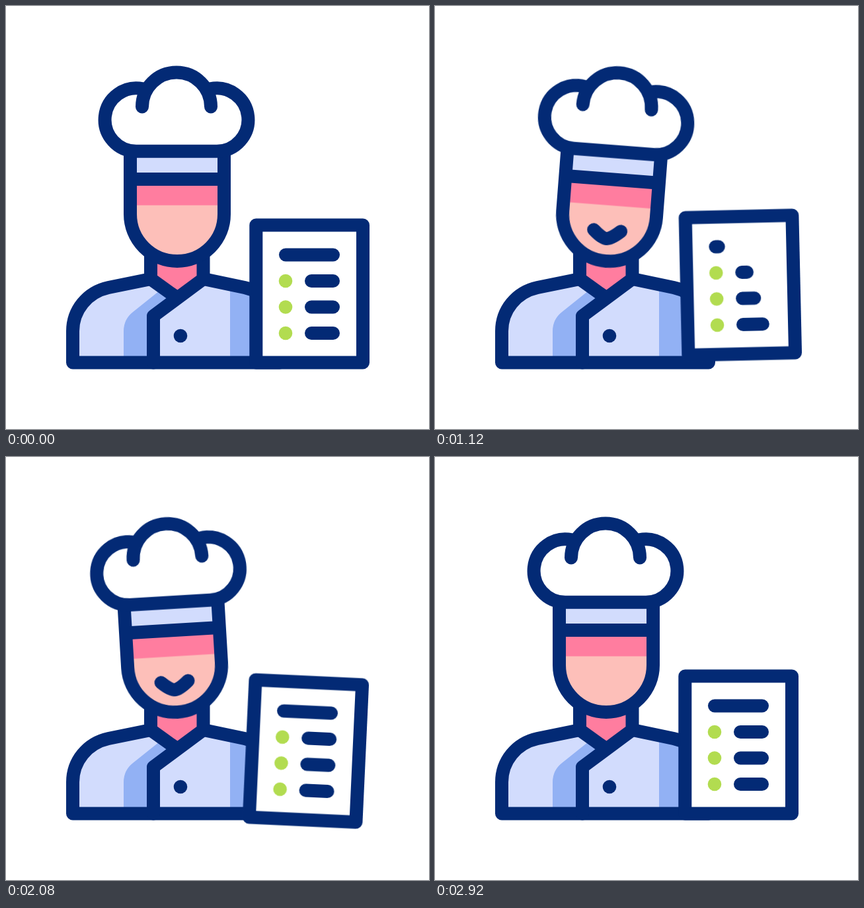
Recreate the animation shown at these times as an HTML page. Size 640x640 px, loop 3.08 s.

```html
<!DOCTYPE html>
<html lang="en">
<head>
<meta charset="utf-8">
<title>Chef with menu</title>
<style>
  html, body { margin: 0; width: 100%; height: 100%; overflow: hidden; background: #fff; }
  svg { display: block; width: 100vw; height: 100vh; }

  .ink { fill: none; stroke: #032a75; stroke-width: 20; stroke-linecap: round; stroke-linejoin: round; }
  .cloth { fill: #d2dcfd; }
  .shade { fill: #92b1f4; }
  .pink { fill: #ff7d9f; }
  .skin { fill: #fdbfb9; }
  .white { fill: #fff; }
  .green { fill: #b2dc50; }
  .gold { fill: #ffcb4f; }

  .head, .tilt, .lift, .trim, .smile, .gold {
    animation: 3080ms cubic-bezier(.37, 0, .63, 1) infinite both;
  }
  .head { transform-origin: 259px 381px; animation-name: nod; }
  .tilt { transform-origin: 459px 313px; animation-name: tilt; }
  .lift { animation-name: lift; }
  .smile { stroke-dasharray: 1.02 2; animation-name: smile; }
  .trim { stroke-dasharray: 1.02 2; animation-timing-function: linear; }
  .gold { transform-box: fill-box; transform-origin: center; animation-name: rise, pop; }

  @keyframes nod {
    0%, 7.79%, 45.45%, 47.08%, 81.17%, 100% { transform: rotate(0deg); }
    16.23%, 72.08% { transform: rotate(-5deg); }
    33.77%, 54.9% { transform: rotate(5deg); }
  }
  @keyframes tilt {
    0%, 9.74%, 80.84%, 100% { transform: rotate(0deg); }
    20.97%, 41.23%, 61.36% { transform: rotate(-5.5deg); }
    29.87%, 51.95%, 70.78% { transform: rotate(5.5deg); }
  }
  @keyframes lift {
    0%, 7.79%, 76.95%, 100% { transform: translateY(0); }
    16.88%, 38.31%, 58.44% { transform: translateY(-15px); }
    27.92%, 48.05%, 68.5% { transform: translateY(10px); }
  }
  @keyframes smile {
    0%, 7.79%, 82.47%, 100% { stroke-dashoffset: 1.03; }
    19.48%, 71.43% { stroke-dashoffset: 0; }
  }
  @keyframes title {
    0%, 21.75%, 53.25%, 100% { stroke-dashoffset: 0; }
    37.01% { stroke-dashoffset: 1; }
  }
  @keyframes row1 {
    0%, 23.38%, 56.49%, 100% { stroke-dashoffset: 0; }
    39.94% { stroke-dashoffset: 1; }
  }
  @keyframes row2 {
    0%, 28.9%, 61.04%, 100% { stroke-dashoffset: 0; }
    44.8% { stroke-dashoffset: 1; }
  }
  @keyframes row3 {
    0%, 34.74%, 64.94%, 100% { stroke-dashoffset: 0; }
    48.7% { stroke-dashoffset: 1; }
  }
  @keyframes rise {
    0%, 68.83% { translate: 0 0; }
    94.8%, 100% { translate: 0 -76px; }
  }
  @keyframes pop {
    0%, 68.83%, 94.8%, 100% { scale: 0; }
    74.03%, 88.3% { scale: 1; }
  }
</style>
</head>
<body>
<svg viewBox="0 0 640 640">
  <!-- body -->
  <path class="cloth" d="M101 539.5V492C101 460 123 433 155 426L219 413H298L361 426C393 433 414 460 414 492V539.5Z"/>
  <path class="shade" d="M178 535V492Q178 474 192 463L232 431L258 441L223 469V535Z"/>
  <path class="shade" d="M339 421L361 426C393 433 414 460 414 492V535H339Z"/>
  <path class="pink" d="M219 380H299V413L259 441L219 413Z"/>
  <g class="ink">
    <path d="M219 413L155 426C123 433 101 460 101 492V539.5H414V492C414 460 393 433 361 426L299 413"/>
    <path d="M219 375V413L254 438M298.5 375V413L223 469V539.5"/>
  </g>
  <circle cx="264" cy="499" r="10.3" fill="#032a75"/>

  <!-- head and hat -->
  <g class="head">
    <circle class="gold" cx="206" cy="119" r="10.5"/>
    <circle class="gold" cx="259" cy="110" r="10.5"/>
    <circle class="gold" cx="313" cy="119" r="10.5"/>
    <path class="skin" d="M188 262V315A71 71 0 0 0 330 315V262Z"/>
    <path class="pink" d="M188 262H330V301.5H188Z"/>
    <path class="cloth" d="M188 220H330V262H188Z"/>
    <path class="white" d="M197 219.5A47.7 47.7 0 1 1 208 125.5A52 52 0 0 1 308 125.5A47.7 47.7 0 1 1 319 219.5Z"/>
    <g class="ink">
      <path d="M188 220V315A71 71 0 0 0 330 315V220M188 262H330"/>
      <path d="M207 125.3A47.7 47.7 0 1 0 197 219.7H319A47.7 47.7 0 1 0 309 125.3"/>
      <path d="M206 152.5A52 52 0 0 1 310 152.5"/>
      <path class="smile" pathLength="1" d="M237 340Q250 352 257 352Q264 352 278 339.5"/>
    </g>
  </g>

  <!-- menu card -->
  <g class="lift">
    <g class="tilt">
      <path class="ink" style="fill:#fff" d="M378.3 331.5H540V539.5H378.3Z"/>
      <circle class="green" cx="423" cy="416" r="10.3"/>
      <circle class="green" cx="423" cy="455.5" r="10.3"/>
      <circle class="green" cx="423" cy="495" r="10.3"/>
      <g class="ink">
        <path class="trim" style="animation-name:title" pathLength="1" d="M423 376.5H495"/>
        <path class="trim" style="animation-name:row1" pathLength="1" d="M462 416H495"/>
        <path class="trim" style="animation-name:row2" pathLength="1" d="M462 455.5H495"/>
        <path class="trim" style="animation-name:row3" pathLength="1" d="M462 495H495"/>
      </g>
    </g>
  </g>
</svg>
</body>
</html>
```
